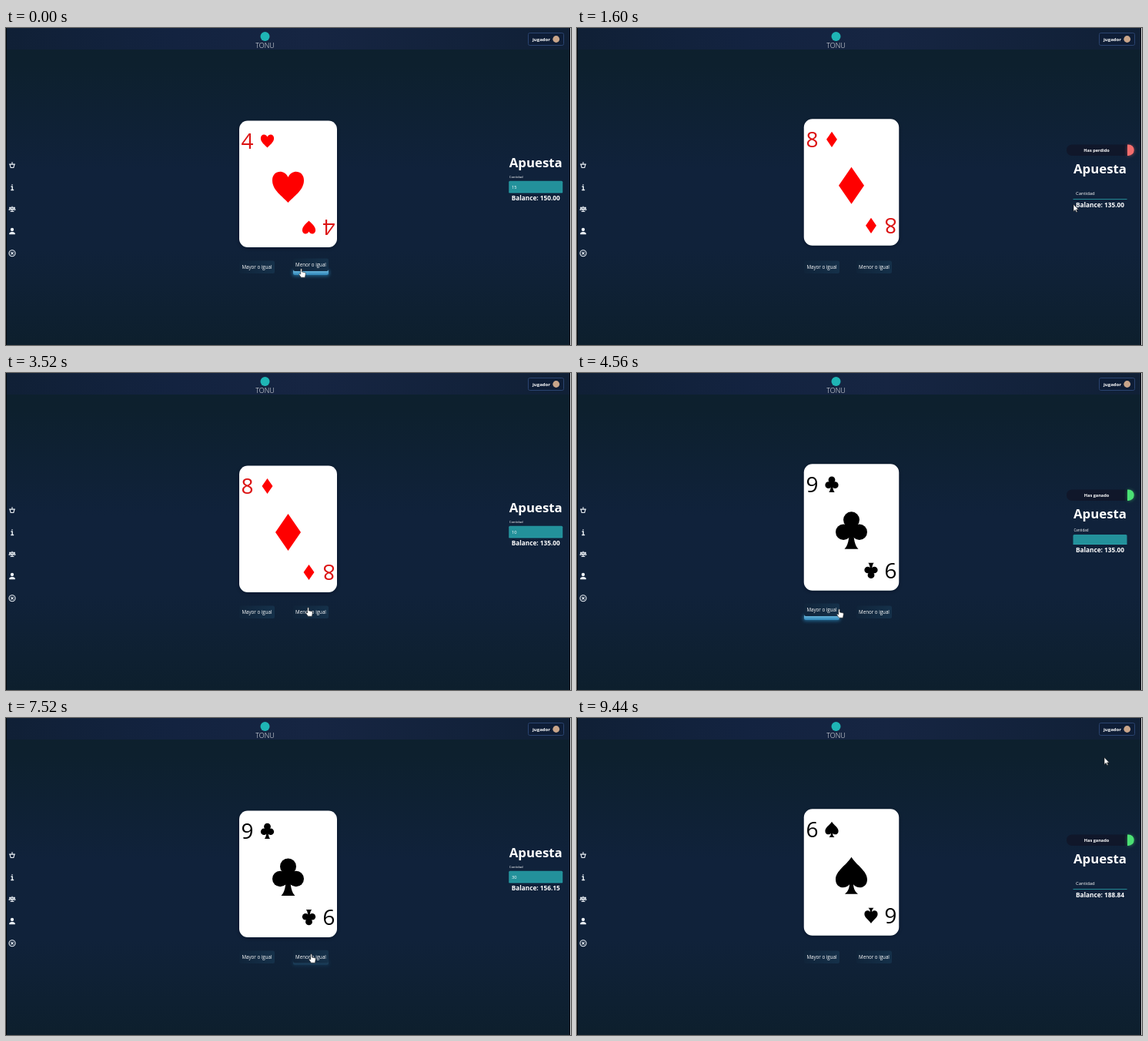
Recreate the animation shown at these times as an HTML page. Size 734x412 px, loop 9520 ms.

```html
<!DOCTYPE html>
<html lang="es">
<head>
<meta charset="utf-8">
<style>
  html, body { margin: 0; width: 100%; height: 100%; overflow: hidden; background: #0d1f2e; }
  svg { display: block; width: 100vw; height: 100vh; }
  text { font-family: "Open Sans", "Noto Sans", sans-serif; fill: #fff; }
  .bold { font-weight: 700; }
  .mid { text-anchor: middle; }
  .icon { fill: none; stroke: #eef3f8; stroke-width: 1.1; stroke-linejoin: round; stroke-linecap: round; }
  .rank { font-size: 28px; fill: inherit; text-anchor: middle; }
</style>
</head>
<body>
<svg viewBox="0 0 734 412" preserveAspectRatio="none">
  <defs>
    <linearGradient id="page" x2="0" y2="1">
      <stop stop-color="#0d202d"/><stop offset=".12" stop-color="#0d202e"/>
      <stop offset=".45" stop-color="#10223b"/><stop offset=".7" stop-color="#10223a"/>
      <stop offset="1" stop-color="#0d1f2d"/>
    </linearGradient>
    <linearGradient id="header">
      <stop stop-color="#102036"/><stop offset=".3" stop-color="#132340"/>
      <stop offset=".55" stop-color="#162542"/><stop offset="1" stop-color="#102036"/>
    </linearGradient>
    <linearGradient id="button">
      <stop stop-color="#10243a"/><stop offset="1" stop-color="#15314a"/>
    </linearGradient>
    <linearGradient id="bar" x2="0" y2="1">
      <stop stop-color="#8fd3f2"/><stop offset="1" stop-color="#2f86b8"/>
    </linearGradient>
    <filter id="soft" x="-50%" y="-50%" width="200%" height="200%"><feGaussianBlur stdDeviation="2"/></filter>
    <path id="hearts" d="M0 20C-7 12-20.5 4-20.5-9C-20.5-22-5-24 0-13C5-24 20.5-22 20.5-9C20.5 4 7 12 0 20Z"/>
    <path id="diamonds" d="M0-24 16.5 0 0 24-16.5 0Z"/>
    <g id="clubs">
      <circle cy="-14" r="10.5"/><circle cx="-10.3" cy="2" r="10.2"/><circle cx="10.3" cy="2" r="10.2"/>
      <path d="M-3-6H3C2 12 5 20 9 24H-9C-5 20-2 12-3-6Z"/>
    </g>
    <path id="spades" d="M0-24C7-13 20.5-6 20.5 5C20.5 16.5 8 18.500 2.500 11.500C3 18 5 21 8.500 24H-8.500C-5 21-3 18-2.500 11.500C-8 18.500-20.5 16.500-20.5 5C-20.5-6-7-13 0-24Z"/>
    <g id="corner">
      <text class="rank" y="10"></text>
      <use class="suit"/>
    </g>
  </defs>

  <rect width="734" height="412" fill="url(#page)"/>
  <rect width="734" height="28" fill="url(#header)"/>
  <path d="M.5 0V412M732.5 0V412" stroke="#02070c"/>
  <path d="M733.5 0V412" stroke="#dfe3e6"/>

  <circle cx="336.5" cy="11" r="6" fill="#1fb5b5"/>
  <text class="mid" x="336.5" y="26" font-size="9" font-weight="300">TONU</text>

  <rect x="678.5" y="6.5" width="46" height="16" rx="2" fill="#0e1d36" stroke="#2a4470"/>
  <text class="bold" x="684" y="16.8" font-size="6">jugador</text>
  <circle cx="714.7" cy="14.5" r="4.4" fill="#c9a58a"/>

  <g class="icon">
    <path d="M5 177.2 6.2 181.5H9.8L11 177.2ZM4.5 177H11.5M8 174.5V177"/>
    <path d="M7 206H8.2V210.3M6.8 210.5H9.6M8 203.7V203.9" stroke-width="1.4"/>
    <path d="M4.5 233.2H11.5M8 232V238M6 238.5H10M4 236.2H7L5.5 233.5ZM9 236.2H12L10.5 233.5Z"/>
    <g fill="#eef3f8"><circle cx="8" cy="262" r="1.6"/><path d="M4.7 267.7C4.7 264.8 11.3 264.8 11.3 267.7Z"/></g>
    <circle cx="8" cy="292.7" r="4"/><path d="M6.6 291.3 9.4 294.1M9.4 291.3 6.6 294.1"/>
  </g>

  <g id="card">
    <rect id="shade" y="-81" height="164" rx="11" fill="#05101c" opacity=".5" filter="url(#soft)"/>
    <rect id="paper" y="-82.5" height="164.5" rx="11" fill="#fff"/>
    <use class="suit" y="4"/>
    <g id="topCorner"><use href="#corner"/></g>
    <g id="lowCorner"><use href="#corner"/></g>
  </g>

  <g id="higher"></g>
  <g id="lower"></g>

  <g id="toast">
    <rect x="636" y="151.5" width="88" height="14.5" rx="7" fill="#10172a"/>
    <path class="tint" d="M715 152h2a7 7 0 0 1 0 14h-2z" filter="url(#soft)" opacity=".5"/>
    <path class="tint" d="M715 151.5h1.5a7.2 7.2 0 0 1 0 14.4h-1.5z"/>
    <text id="notice" class="bold mid" x="675" y="160.8" font-size="5.6"></text>
  </g>

  <g id="panel">
    <text class="bold mid" x="679.5" y="189.4" font-size="16.8">Apuesta</text>
    <text id="label" font-weight="500">Cantidad</text>
    <rect id="field" x="644.5" width="70" rx="1.5" fill="#23919b"/>
    <path d="M644.5 222.5H714.5" stroke="#2aa3ab" stroke-width=".8"/>
    <text id="amount" x="648.3" y="218" font-size="5.6"></text>
    <path id="caret" d="M648.7 211V220" stroke="#d8f4f4" stroke-width=".6"/>
    <text id="balance" class="bold mid" x="679.5" y="232.8" font-size="8.25"></text>
  </g>

  <g id="pointer" stroke-linejoin="round">
    <path id="arrow" d="M0-.8V8.4L2.2 6.4 3.7 9.6 5.1 9 3.7 5.9H6.5Z" fill="#fff" stroke="#111" stroke-width=".6"/>
    <path id="hand" d="M-2.3-5.2C-2.3-6.5-.5-6.5-.5-5.2V-2L3.3-1.2C4.2-1 4.4-.2 4.3.6L3.5 5.2H-1.6L-4.2 1.5C-4.7.5-3.5-.2-2.3 1Z" fill="#fff" stroke="#222" stroke-width=".6"/>
    <path id="beam" d="M-1.2-4H1.2M0-4V4M-1.2 4H1.2" fill="none" stroke="#e8eef2" stroke-width=".7"/>
  </g>
</svg>

<script>
const LOOP = 9520;
const $ = id => document.getElementById(id);
const all = query => document.querySelectorAll(query);
const set = (el, attrs) => Object.entries(attrs).forEach(([k, v]) => el.setAttribute(k, v));
const clamp = v => Math.max(0, Math.min(1, v));
const ease = v => v * v * (3 - 2 * v);
const show = (el, on) => el.style.display = on ? "" : "none";
// Last entry whose start time has passed
const at = (steps, t) => steps.filter(s => s[0] <= t).pop();

const RED = { suit: "#f00", rank: "#dc1414" };
const BLACK = { suit: "#000", rank: "#000" };
const cards = [
  [0, "4", "hearts", RED], [1040, "8", "diamonds", RED],
  [4480, "9", "clubs", BLACK], [8080, "6", "spades", BLACK]
];
const notices = [
  [0, ""], [1040, "Has perdido", "#f46d6d"], [2880, ""],
  [4480, "Has ganado", "#4be074"], [6640, ""], [8080, "Has ganado", "#4be074"]
];
const amounts = [
  [0, "15"], [1040, ""], [2320, "1"], [2560, "10"],
  [4480, ""], [6800, "3"], [6960, "30"], [8080, ""]
];
const balances = [[0, "150.00"], [1200, "135.00"], [4640, "156.15"], [8240, "188.84"]];
// When the field opens (1) or collapses to a line (0)
const fieldStates = [[-999, 1], [1040, 0], [1920, 1], [4480, 0], [6000, 1], [8080, 0]];
const focus = [[1920, 2960], [6000, 7120]];
const hovers = {
  lower: [[-999, 1180], [3560, 3900], [7460, 8600]],
  higher: [[4120, 4940]]
};
const path = [
  [0, 385, 319], [1040, 386, 319], [1600, 645, 230], [1900, 668, 216], [2720, 668, 216],
  [3520, 394, 311], [3840, 394, 311], [4160, 334, 311], [4560, 342, 313], [4880, 343, 313],
  [5600, 668, 216], [6000, 668, 217], [6480, 661, 230], [6960, 661, 230],
  [7520, 398, 313], [8560, 398, 314], [9200, 682, 62], [9440, 685, 52], [LOOP, 685, 52]
];
const pointers = [
  [0, "hand"], [1200, "arrow"], [1760, "beam"], [2840, "arrow"], [3440, "hand"], [3920, "arrow"],
  [4120, "hand"], [4960, "arrow"], [5520, "beam"], [7040, "arrow"], [7440, "hand"], [8640, "arrow"]
];

for (const [id, title] of [["higher", "Mayor o igual"], ["lower", "Menor o igual"]]) {
  $(id).innerHTML = `
    <g class="glow">
      <rect x="-1" y="314" width="48" height="8.5" rx="3" fill="#2e8fc4" opacity=".6" filter="url(#soft)"/>
      <rect y="312" width="46" height="9" rx="2.5" fill="url(#bar)"/>
    </g>
    <g class="face">
      <rect y="302.5" width="46" height="16.5" rx="2.5" fill="url(#button)"/>
      <text class="mid" x="23" y="313.3" font-size="6.2" font-weight="500">${title}</text>
    </g>`;
}

function drawButton(id, x, t) {
  const lift = Math.max(...hovers[id].map(([from, to]) =>
    Math.min(clamp((t - from) / 200), clamp((to + 160 - t) / 160))));
  const group = $(id);
  set(group, { transform: `translate(${x} 0)` });
  set(group.querySelector(".glow"), { opacity: ease(lift) });
  set(group.querySelector(".face"), { transform: `translate(0 ${-3 * ease(lift)})` });
}

function drawCard(t, wide) {
  const [, rank, suit, color] = at(cards, t);
  const width = wide ? 127 : 123.5, rankX = wide ? 53 : 51;
  set($("card"), { transform: wide ? "translate(366.5 203)" : "translate(356.5 200.8)", fill: color.suit });
  set($("paper"), { x: -width / 2, width });
  set($("shade"), { x: -width / 2, width });
  all(".suit").forEach(el => set(el, { href: "#" + suit }));
  set(document.querySelector("#corner .suit"), { transform: `translate(${wide ? 26 : 25.5} 0) scale(.42)` });
  const label = document.querySelector(".rank");
  label.textContent = rank;
  label.style.fill = color.rank;
  set($("topCorner"), { transform: `translate(${-rankX} -56)` });
  set($("lowCorner"), { transform: `translate(${rankX} 56) rotate(180)` });
}

function drawPanel(t, wide) {
  const [start, open] = at(fieldStates, t);
  const moved = ease(clamp((t - start) / 320));
  const shut = open ? 1 - moved : moved;
  set($("panel"), { transform: wide ? "translate(8.7 -8.7)" : "" });
  set($("label"), { x: 645 + 3 * shut, y: 204 + 13 * shut, "font-size": 4.3 + 1.6 * shut });
  set($("field"), { y: 207.5 + 15.5 * shut, height: 15.5 * (1 - shut) });
  const value = at(amounts, t)[1];
  $("amount").textContent = value;
  const active = focus.find(([from, to]) => t >= from && t < to);
  show($("caret"), active && (t - active[0]) % 1060 < 530);
  set($("caret"), { transform: `translate(${value.length * 3.2} 0)` });
  $("balance").textContent = "Balance: " + at(balances, t)[1];
}

function drawPointer(t) {
  const i = path.findIndex(p => p[0] > t);
  const [t0, x0, y0] = path[i - 1], [t1, x1, y1] = path[i];
  const k = ease((t - t0) / (t1 - t0));
  set($("pointer"), { transform: `translate(${x0 + (x1 - x0) * k} ${y0 + (y1 - y0) * k})` });
  const kind = at(pointers, t)[1];
  for (const id of ["arrow", "hand", "beam"]) show($(id), id === kind);
}

function draw(now) {
  const t = now % LOOP;
  const [, message, tint] = at(notices, t);
  const wide = !message;
  drawCard(t, wide);
  drawButton("higher", wide ? 303 : 295, t);
  drawButton("lower", wide ? 373 : 363, t);
  drawPanel(t, wide);
  show($("toast"), message);
  $("notice").textContent = message;
  if (tint) all(".tint").forEach(el => set(el, { fill: tint }));
  drawPointer(t);
  requestAnimationFrame(draw);
}
draw(0);
</script>
</body>
</html>
```
